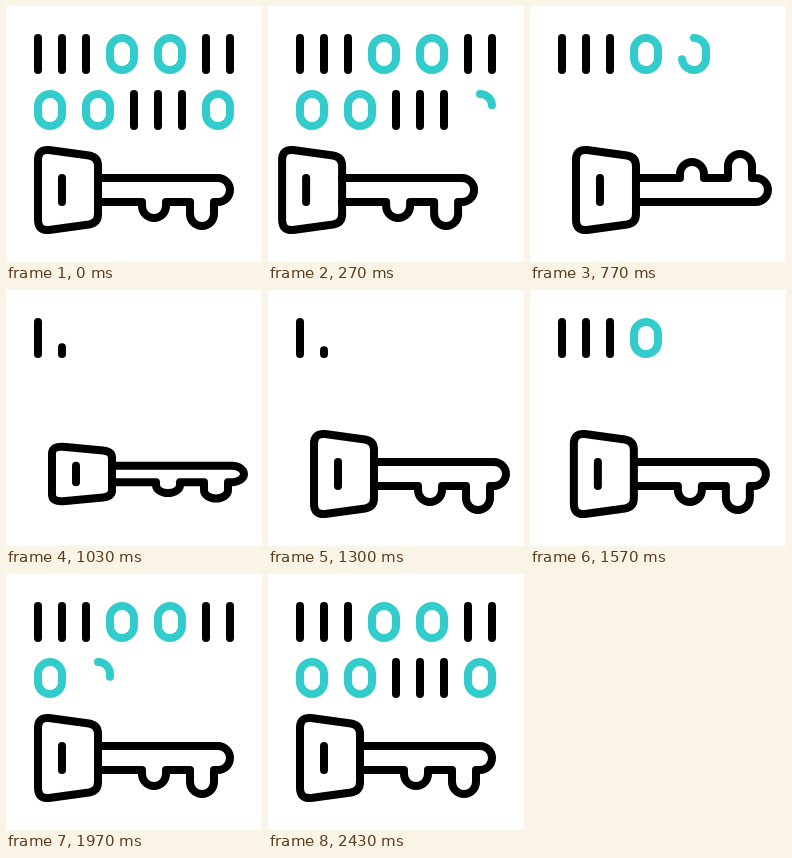
Animation of 256x256 px, one loop 2.5 s. Source, as an HTML page:

```html
<!DOCTYPE html>
<html lang="en">
<head>
<meta charset="utf-8">
<title>Key and bits</title>
<style>
  @property --shown { syntax: "<number>"; inherits: true; initial-value: 13; }

  html, body { margin: 0; width: 100%; height: 100%; overflow: hidden; background: #fff; }
  svg { display: block; width: 256px; height: 256px; }
  path { fill: none; stroke: #000; stroke-width: 8; stroke-linecap: round; stroke-linejoin: round; }

  #bits { animation: count 2.5s linear infinite; }
  #bits path {
    stroke-dasharray: 1 2;
    stroke-dashoffset: calc(1px * clamp(0, (var(--i) + 1 - var(--shown)) * 1.02, 1.02));
  }
  #bits .zero { stroke: #33cccc; }

  #key {
    transform-box: view-box;
    transform-origin: 0 184px;
    animation: slide 2.5s cubic-bezier(.333, 0, .667, 1) infinite,
               turn 2.5s cubic-bezier(.333, 0, .667, 1) infinite;
  }
  #key path { vector-effect: non-scaling-stroke; }

  /* number of bits drawn so far */
  @keyframes count {
    0%, 7.3% { --shown: 13; }
    11.8% { --shown: 12; }
    17.1% { --shown: 9; }
    21.36% { --shown: 8; }
    26% { --shown: 7; }
    29.5% { --shown: 5; }
    38.4% { --shown: 3; }
    43.2%, 47.8% { --shown: 0; }
    62.8% { --shown: 4; }
    78.8% { --shown: 8.24; }
    96.8%, 100% { --shown: 13; }
  }
  @keyframes slide {
    0% { translate: 0 0; }
    7.2% { translate: -20px 0; }
    31.2%, 57.7% { translate: 14px 0; }
    78.5%, 100% { translate: 0 0; }
  }
  @keyframes turn {
    0%, 16% { scale: 1 1; }
    30.7% { scale: 1 -1; }
    44.8%, 100% { scale: 1 1; }
  }
</style>
</head>
<body>
<svg viewBox="0 0 256 256">
  <g id="bits"></g>
  <g id="key">
    <path d="M32 154V214Q32 225 43 224L83 218.5Q92 217 92 208V160Q92 151 83 149.500L43 144Q32 143 32 154Z"/>
    <path d="M56 172V196"/>
    <path d="M92 172H212A12 12 0 0 1 212 196H208V208A12 12 0 0 1 184 208V196H160V200A12 12 0 0 1 136 200V196H92"/>
  </g>
</svg>
<script>
  const bits = document.getElementById("bits");
  const bar = (x, y) => `M${x + 4} ${y + 32}v-32`;
  const ring = (x, y) => `M${x + 16} ${y}a12 12 0 0 1 12 12v8a12 12 0 0 1 -24 0v-8a12 12 0 0 1 12 -12`;
  let index = 0;

  function addRow(digits, y) {
    let x = 28;
    for (const digit of digits) {
      const zero = digit === "0";
      const path = document.createElementNS("http://www.w3.org/2000/svg", "path");
      path.setAttribute("d", (zero ? ring : bar)(x, y));
      path.setAttribute("pathLength", 1);
      path.setAttribute("class", zero ? "zero" : "one");
      path.style.setProperty("--i", index++);
      bits.append(path);
      x += zero ? 48 : 24;
    }
  }

  addRow("1110011", 32);
  addRow("001110", 88);
</script>
</body>
</html>
```
